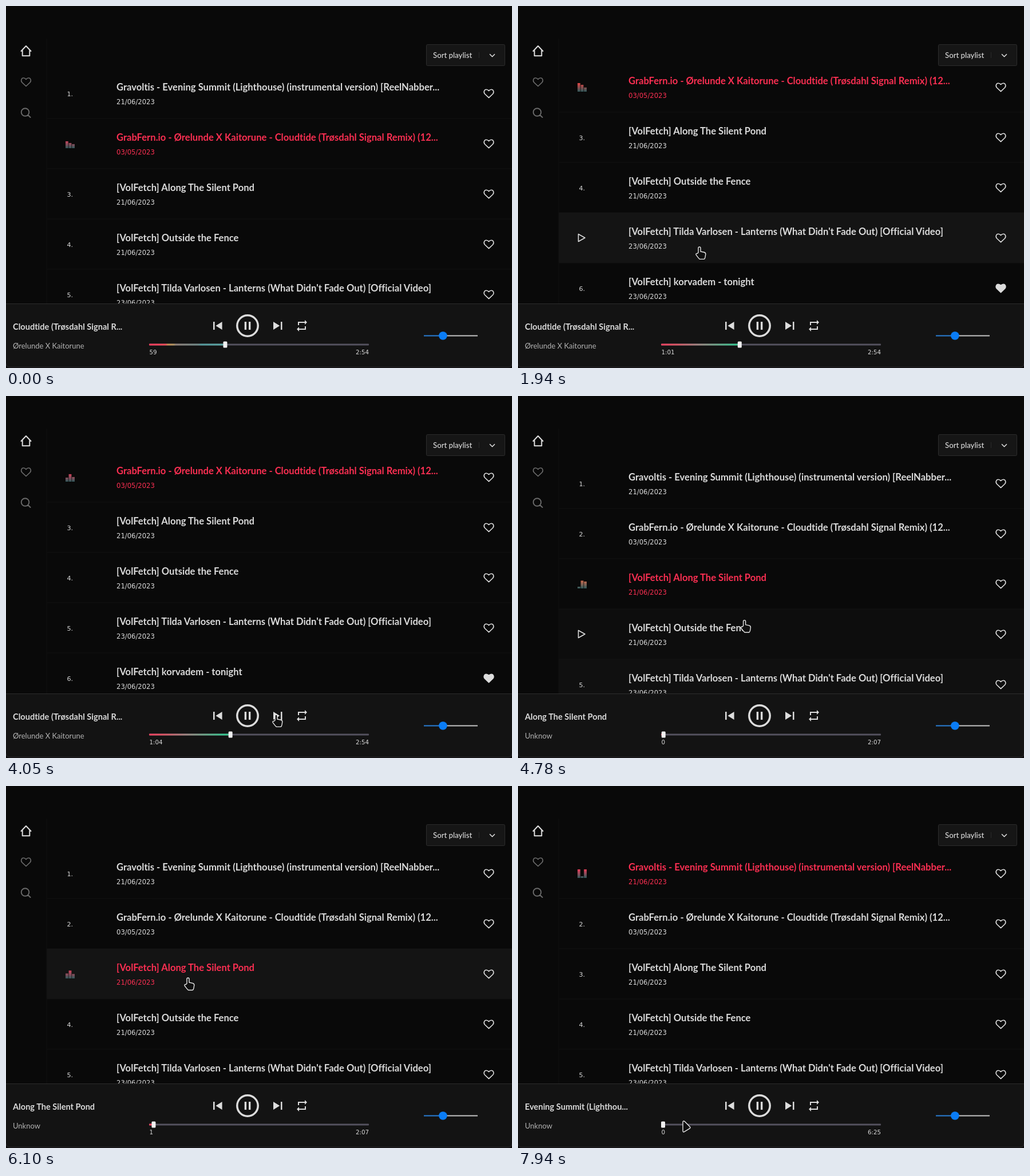
Write an HTML page that moves like this. It is 884x634 px and loops after 7.99 s.

```html
<!DOCTYPE html>
<html lang="en">
<head>
<meta charset="utf-8">
<title>Music player</title>
<style>
  html, body { margin: 0; width: 100%; height: 100%; overflow: hidden; background: #090909; }
  svg { display: block; width: 100%; height: 100%; font-family: Lato, "Open Sans", sans-serif; font-variant-ligatures: none; }
  text { fill: #dadada; white-space: pre; }
  .title { font-size: 16.6px; font-weight: 700; }
  .date, .num, .time { font-family: "DejaVu Sans", sans-serif; }
  .date { font-size: 11.6px; }
  .num { font-size: 11.2px; }
  .time { font-size: 10.3px; }
  .playing .title, .playing .date { fill: #fb2f52; }
  .line { fill: none; stroke: #dcdcdc; stroke-width: 1.6; stroke-linejoin: round; stroke-linecap: round; }
  .dim { stroke: #6a6a6a; }
  .solid { fill: #dcdcdc; }
  #cursor path { fill: #101010; stroke: #e6e6e6; stroke-width: 1.4; stroke-linejoin: round; }
</style>
</head>
<body>
<svg viewBox="0 0 884 634">
  <defs>
    <clipPath id="view"><rect x="71" y="102" width="813" height="419"/></clipPath>
    <path id="heart" d="M0 7.5L-7 .8C-9.6-1.9-8.2-7-4.4-7C-2.4-7-.9-5.8 0-4.6C.9-5.8 2.4-7 4.4-7C8.2-7 9.6-1.9 7 .8Z"/>
    <linearGradient id="bars" gradientUnits="userSpaceOnUse" x1="0" y1="38" x2="0" y2="52">
      <stop id="barTop" offset="0"/><stop offset="1" stop-color="#2f5a5c"/>
    </linearGradient>
    <linearGradient id="fade" gradientUnits="userSpaceOnUse" x1="250" y1="0" x2="380" y2="0">
      <stop offset="0" stop-color="#f0405f"/><stop offset=".2" stop-color="#dc5564"/>
      <stop offset=".5" stop-color="#a08783"/><stop offset="1" stop-color="#38c690"/>
    </linearGradient>
    <linearGradient id="fadeWarm" gradientUnits="userSpaceOnUse" x1="250" y1="0" x2="380" y2="0">
      <stop offset="0" stop-color="#f83a5c"/><stop offset=".22" stop-color="#f04a58"/>
      <stop offset=".25" stop-color="#c98a50"/><stop offset=".33" stop-color="#b09560"/>
      <stop offset=".36" stop-color="#8f8078"/><stop offset=".66" stop-color="#6f8a88"/>
      <stop offset=".7" stop-color="#549a9c"/><stop offset="1" stop-color="#5aa6a4"/>
    </linearGradient>
  </defs>

  <rect width="884" height="634" fill="#090909"/>
  <g id="list" clip-path="url(#view)"></g>
  <rect x="70.5" y="57" width="1" height="464" fill="#111"/>

  <path class="line" style="stroke-width:2" d="M26.5 79L35 70L43.5 79M28.7 77.5V87.3H41.3V77.5"/>
  <use href="#heart" class="line dim" x="35" y="133"/>
  <path class="line dim" style="stroke-width:1.9" d="M40.3 186a6.8 6.8 0 1 1-13.6 0a6.8 6.8 0 1 1 13.6 0M38.5 191L42.6 195"/>

  <rect x="734.5" y="67.5" width="137" height="37" rx="2" fill="#161616" stroke="#2c2c2c"/>
  <text x="746" y="91" font-size="13.2" font-weight="500">Sort playlist</text>
  <path d="M826.5 81V91" stroke="#2a2a2a"/>
  <path class="line" d="M845.5 84.7L849.5 88.7L853.5 84.7"/>

  <path d="M0 521H884V626Q884 633 877 633H7Q0 633 0 626Z" fill="#131313"/>
  <path d="M0 521.5H884" stroke="#2d2d2d"/>
  <path d="M0 626Q0 632.5 7 632.5H877Q884 632.5 884 626" fill="none" stroke="#2b2a2e"/>
  <text id="song" x="12" y="566.5" font-size="14.6" font-weight="700"></text>
  <text id="artist" x="12" y="600" font-size="13" style="fill:#b2b2b2"></text>

  <path class="solid" d="M362 553h2.6v14H362zM377.6 553v14l-11.2-7zM467 553v14l11.2-7zM480 553h2.5v14H480z"/>
  <circle cx="422" cy="560" r="18.2" fill="none" stroke="#dcdcdc" stroke-width="3.5"/>
  <path class="solid" d="M416.7 553h3.4v14h-3.4zM424 553h3.4v14H424z"/>
  <path class="solid" transform="translate(505 548)" d="M7 7h10v3l4-4-4-4v3H5v6h2zM17 17H7v-3l-4 4 4 4v-3h12v-6h-2z"/>

  <rect x="250" y="591.5" width="384" height="3" rx="1" fill="#55525f"/>
  <rect id="fill" x="250" y="591.5" height="3" rx="1"/>
  <rect id="thumb" y="587.5" width="7" height="11" rx="1.5" fill="#f0f0f0"/>
  <text id="now" class="time" x="250.5" y="610"></text>
  <text id="total" class="time" x="634" y="610" text-anchor="end"></text>

  <path d="M763 577.5H824" stroke="#c4c4c4" stroke-width="2"/>
  <path d="M730 577.5H763" stroke="#2a7fd6" stroke-width="2"/>
  <circle cx="763.4" cy="577.5" r="7.3" fill="#0a7cf5"/>

  <g id="cursor">
    <path id="hand" d="M-2 8V0a2 2 0 0 1 4 0V6l6 1.3c2 .5 3 1.6 2.8 3.6l-.8 5c-.3 1.8-1 3-2 3.5h-7.5c-1.5-.7-4-4.5-6.3-7.5c-1-1.5.5-3 2-2.3Z"/>
    <path id="arrow" d="M0 1.5V17c0 2 1.3 2.4 2.8 1.4l9-5.6c1.6-1 1.5-2.2.2-3.2L3.2.6C1.6-.8 0-.4 0 1.5Z"/>
  </g>
</svg>
<script>
const LOOP = 7990, ROW = 88, TOP = 109, FOOT = 521;
const $ = id => document.getElementById(id);

const tracks = [
  ['Gravoltis - Evening Summit (Lighthouse) (instrumental version) [ReelNabber...', '21/06/2023'],
  ['GrabFern.io - Ørelunde X Kaitorune - Cloudtide (Trøsdahl Signal Remix) (12...', '03/05/2023'],
  ['[VolFetch] Along The Silent Pond', '21/06/2023'],
  ['[VolFetch] Outside the Fence', '21/06/2023'],
  ["[VolFetch] Tilda Varlosen - Lanterns (What Didn't Fade Out) [Official Video]", '23/06/2023'],
  ['[VolFetch] korvadem - tonight', '23/06/2023']
];

// Each song: when it is picked, its row, labels, length, and clock zero.
const plays = [
  { from: 0, row: 1, song: 'Cloudtide (Trøsdahl Signal R...', artist: 'Ørelunde X Kaitorune', length: 174, zero: -59980 },
  { from: 4350, row: 2, song: 'Along The Silent Pond', artist: 'Unknow', length: 127, zero: 4510 },
  { from: 7480, row: 0, song: 'Evening Summit (Lighthou...', artist: 'Unknow', length: 385, zero: 7950 }
];

// Pointer path: time, x, y
const path = [
  [560, 569, 588], [830, 560, 575], [1050, 430, 500], [1260, 320, 430], [1390, 317, 424],
  [1950, 317, 424], [2070, 335, 450], [2260, 470, 594], [2370, 486, 580], [2440, 474, 562],
  [2560, 472, 560], [4500, 472, 560], [4720, 420, 480], [4920, 340, 200], [5010, 338, 150],
  [5160, 365, 511], [5300, 380, 560], [5700, 330, 400], [6000, 318, 340], [6520, 318, 330],
  [6700, 317, 255], [6870, 316, 194], [7020, 317, 150], [7480, 317, 150], [7600, 319, 400],
  [7740, 322, 615], [7940, 288, 587]
];

// Equaliser bars: time, three heights
const beats = [
  [0, 12, 9, 7], [1390, 13, 5.5, 13], [2370, 13, 12, 11], [4050, 7, 13, 8],
  [5160, 7, 15, 7], [6870, 14, 4, 7], [LOOP, 13, 5, 12]
];

const clamp = (v, lo, hi) => Math.min(hi, Math.max(lo, v));

function segment(keys, t) {
  let i = 0;
  while (i < keys.length - 2 && t >= keys[i + 1][0]) i++;
  const [a, b] = [keys[i], keys[i + 1]];
  const u = clamp((t - a[0]) / (b[0] - a[0]), 0, 1);
  return { u, span: b[0] - a[0], at: n => a[n] + (b[n] - a[n]) * u };
}

function pointer(t) {
  if (t < path[0][0]) return null;
  const s = segment(path, t);
  return { x: s.at(1), y: s.at(2) };
}

function scroll(t) {
  if (t >= plays[1].from) return 0;
  const u = clamp((t - 1740) / 190, 0, 1);
  return 99 * u * u * (3 - 2 * u);
}

function hovered(t) {
  const p = pointer(t);
  if (!p || p.x < 71 || p.y < 102 || p.y >= FOOT) return -1;
  return Math.floor((p.y + 4 + scroll(t) - TOP) / ROW);
}

function hoverFade(row, t) {
  let hits = 0;
  for (let k = 0; k < 10; k++) if (hovered(t - k * 12) === row) hits++;
  return hits / 10;
}

const clock = s => s < 60 ? `${s}` : `${Math.floor(s / 60)}:${String(s % 60).padStart(2, '0')}`;

$('list').innerHTML = '<g id="rows">' + tracks.map(([title, date], i) => `
  <g class="row" transform="translate(0 ${TOP + i * ROW})">
    <rect class="back" x="71" width="813" height="${ROW}" fill="#141414"/>
    <rect x="71" y="${ROW - 0.5}" width="813" height="1" fill="#121212"/>
    <text class="num" x="106.5" y="48.5">${i + 1}.</text>
    <path class="line play" d="M105.5 37.5V50.5L117 44Z"/>
    <g class="eq" fill="url(#bars)">${[104, 109.6, 115.2].map(x => `<rect x="${x}" width="4.8"/>`).join('')}</g>
    <text class="title" x="193" y="38.5">${title}</text>
    <text class="date" x="193" y="63.3">${date}</text>
    <use href="#heart" class="line" x="843.5" y="44.2"${i === 5 ? ' style="fill:#dcdcdc"' : ''}/>
  </g>`).join('') + '</g>';

const rows = [...document.querySelectorAll('.row')].map(el => ({
  el,
  back: el.querySelector('.back'),
  num: el.querySelector('.num'),
  play: el.querySelector('.play'),
  eq: el.querySelector('.eq'),
  bars: el.querySelectorAll('.eq rect')
}));

const show = (el, on) => el.setAttribute('visibility', on ? 'visible' : 'hidden');

function drawBars(bars, t) {
  const s = segment(beats, t);
  const swings = Math.round(s.span / 230);
  bars.forEach((bar, i) => {
    const swing = 5 * Math.sin(Math.PI * (swings + i) * s.u);
    const h = clamp(s.at(i + 1) + swing, 3, 15);
    bar.setAttribute('y', 52 - h);
    bar.setAttribute('height', h);
  });
  const warm = Math.max(0, Math.cos(2 * Math.PI * (t - 1390) / 3770)) ** 3;
  $('barTop').setAttribute('stop-color', `hsl(${350 + 45 * warm} ${72 - 26 * warm}% 56%)`);
}

function drawRows(t, current) {
  const over = hovered(t);
  $('rows').setAttribute('transform', `translate(0 ${-scroll(t)})`);
  rows.forEach((row, i) => {
    const playing = i === current;
    row.el.classList.toggle('playing', playing);
    row.back.setAttribute('opacity', hoverFade(i, t));
    show(row.eq, playing);
    show(row.play, !playing && i === over);
    show(row.num, !playing && i !== over);
    if (playing) drawBars(row.bars, t);
  });
}

function drawPlayer(t, play) {
  const sec = Math.max(0, Math.floor((t - play.zero) / 250) / 4);
  const x = 253.5 + 377 * sec / play.length;
  $('song').textContent = play.song;
  $('artist').textContent = play.artist;
  $('now').textContent = clock(Math.floor(sec));
  $('total').textContent = clock(play.length);
  $('thumb').setAttribute('x', x - 3.5);
  $('fill').setAttribute('width', x - 250);
  $('fill').setAttribute('fill', t < 830 ? 'url(#fadeWarm)' : 'url(#fade)');
}

function drawPointer(t) {
  const p = pointer(t);
  show($('cursor'), p);
  if (!p) return;
  const onNext = Math.abs(p.x - 474) < 11 && Math.abs(p.y - 560) < 13;
  const hand = onNext || hovered(t) >= 0;
  $('cursor').setAttribute('transform', `translate(${p.x} ${p.y})`);
  $('hand').style.display = hand ? '' : 'none';
  $('arrow').style.display = hand ? 'none' : '';
}

function draw(t) {
  const play = plays.filter(p => t >= p.from).pop();
  drawRows(t, play.row);
  drawPlayer(t, play);
  drawPointer(t);
}

const start = performance.now();
function tick() {
  draw((performance.now() - start) % LOOP);
  requestAnimationFrame(tick);
}
tick();
</script>
</body>
</html>
```
